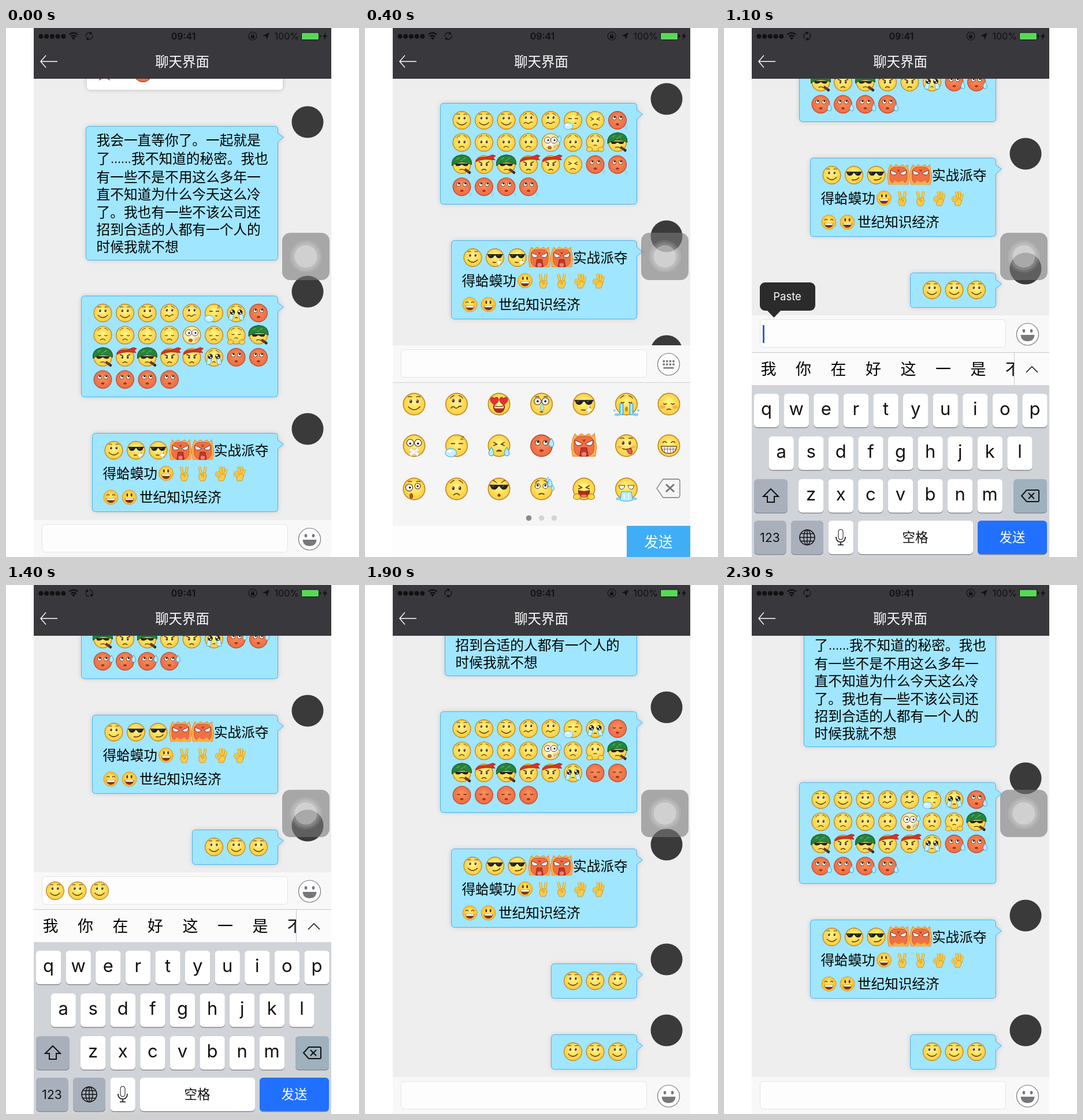
An HTML page with a canvas that plays this animation: 611 px wide and 917 px high, repeating every 2400 ms.

```html
<!DOCTYPE html>
<html lang="zh-CN">
<head>
<meta charset="utf-8">
<title>聊天界面</title>
<style>
html, body { margin: 0; width: 100%; height: 100%; overflow: hidden; background: #fff }
canvas { display: block }
</style>
</head>
<body>
<canvas id="stage" width="611" height="917"></canvas>
<script>
const c = document.getElementById('stage').getContext('2d');
const CJK = '"Noto Sans CJK SC", "Noto Sans CJK", sans-serif', LATIN = 'Inter, sans-serif';
const INK = '#5a300c', GOLD = '#b87a1b', BLUE = '#7fd3f7', SEA = '#2d9fd6';

// ---- drawing helpers ----
function paint(p, fill, line, w = 1) {
  if (fill) { c.fillStyle = fill; c.fill(p); }
  if (line) { c.strokeStyle = line; c.lineWidth = w; c.stroke(p); }
}
const path = (d, fill, line, w) => paint(new Path2D(d), fill, line, w);
function oval(x, y, rx, ry, fill, line, w) {
  const p = new Path2D();
  p.ellipse(x, y, rx, ry, 0, 0, 7);
  paint(p, fill, line, w);
}
const disc = (x, y, r, fill, line, w) => oval(x, y, r, r, fill, line, w);
function box(x, y, w, h, r, fill, line) {
  const p = new Path2D();
  p.roundRect(x, y, w, h, r);
  paint(p, fill, line);
}
function rect(x, y, w, h, fill) { c.fillStyle = fill; c.fillRect(x, y, w, h); }
function text(s, x, y, size, color = '#000', align = 'left', family = CJK, weight = 400) {
  c.font = `${weight} ${size}px ${family}`;
  c.fillStyle = color;
  c.textAlign = align;
  c.fillText(s, x, y + size * .37);
}
const label = (s, x, y, size, color) => text(s, x, y, size, color, 'center', CJK, 300);
function at(x, y, scale, draw, turn = 0) {
  c.save();
  c.translate(x, y);
  c.rotate(turn);
  c.scale(scale, scale);
  draw();
  c.restore();
}
const both = f => [-1, 1].forEach(f);

// ---- faces, drawn in a circle of radius 16 ----
function head(inner = '#fff27e', outer = '#fbcd3c', line = GOLD) {
  const g = c.createRadialGradient(0, -4, 2, 0, 0, 16);
  g.addColorStop(0, inner);
  g.addColorStop(1, outer);
  disc(0, 0, 15.4, g, line, 1.1);
}
const line = (d, w = 1.3, color = INK) => path(d, null, color, w);
const brows = tilt => both(s => line(`M${s * 9} ${-10 + tilt}Q${s * 6} ${-12} ${s * 3} ${-10 - tilt}`, 1));
const dots = (y = -4) => both(s => {
  oval(s * 4.7, y, 2.7, 3.4, '#fff6c8');
  oval(s * 4.7, y, 1.9, 2.6, INK);
  disc(s * 4.7 - .5, y - 1, .7, '#fff');
});
const whites = (r = 5, dx = 0, dy = 0) => both(s => {
  disc(s * 5.5, -4, r, '#fff', INK, .9);
  disc(s * 5.5 + dx, -4 + dy, 1.5, '#111');
});
const closed = (y = -2) => both(s => line(`M${s * 8} ${y}Q${s * 5.5} ${y + 2.5} ${s * 3} ${y}`));
const squint = () => both(s => line(`M${s * 8} -5L${s * 3} -2L${s * 8} 0`));
const frown = () => line('M-4.5 9Q0 4 4.5 9');
const drop = (x, y, k = 1) => at(x, y, k, () => path('M0 -5Q4 1 3 3A3 3 0 0 1 -3 3Q-4 1 0 -5Z', '#b4ebff', SEA, .8));
const shades = () => {
  path('M-14 -6H14L12 -3Q11 1 7 1Q3 1 1 -3.5H-1Q-3 1 -7 1Q-11 1 -12 -3Z', '#202226');
  line('M-10 -3L-7 -4.5M4 -3L7 -4.5', .9, '#777');
};
const hands = y => both(s => oval(s * 10, y, 5, 4, '#ffd84a', GOLD));
const shout = () => path('M-8 2Q0 5 8 2Q8 12 0 12Q-8 12 -8 2Z', '#b32a1c', INK, .8);
const finger = d => { line(d, 5.6, '#c58b1d'); line(d, 4.2, '#fbcb45'); };
const FALL = { 2: -5, 3: -1, 4: 13, 5: 5, 7: -5 };

const faces = {
  smile() { head(); brows(0); dots(); line('M-8.5 3.5Q0 12.5 8.5 3.5'); },
  worry() { head(); brows(2); dots(-5); line('M-8 6q2.5 -4 5 -1.5t5 0 5 -1'); },
  sleep() {
    head(); line('M-8 -3H-2M3 -3H9');
    line('M2 5H6');
    line('M6 -13H10L6 -9H10', 1, '#a06b10');
    oval(-8, 10, 8, 6, '#c9f1ff', '#55b4e0');
    oval(-10, 8, 3, 1.6, '#fff');
  },
  cry(p) {
    head();
    if (p === 4) { squint(); frown(); return; }
    both(s => {
      path(`M${s * 4} 1H${s * 11}L${s * 13} 12H${s * 6}Z`, '#c5f0ff', SEA, .7);
      disc(s * 6.5, -1.5, 4.4, '#222');
      disc(s * 6.5 - 1.5, -3, 1.8, '#fff');
      disc(s * 6.5 + 1, .5, 1.2, '#fff');
    });
    brows(2);
    line('M-2.5 9Q0 6 2.5 9');
  },
  red(p) {
    head('#f98d58', '#ee6a44', '#bb4128');
    if (p === 1) closed();
    else whites(3.4, .6, -1.4);
    oval(0, 7, 2.6, 1.4, '#b23823', '#7e2010', .7);
    if (p in FALL) drop(p === 7 ? 14 : 15, FALL[p], p === 4 ? .5 : 1.1);
  },
  sad(p) { head(); brows(2); p ? dots(-1) : closed(0); frown(); },
  shock(p) {
    head('#fff', '#ffdf72');
    whites(5.4, 1, 0);
    oval(-2, 9, 3, 2.5, '#e2682c', INK, .8);
    line('M6 5V11M9 4V10M12 3V8', .8, '#7b6b60');
    if (p) drop(15, -7);
  },
  palms(p) { head(); brows(2); p ? dots(-3) : closed(); line('M-3 6Q0 3 3 6'); hands(12); },
  helmet() {
    head(); line('M-4 9Q0 7 4 9');
    path('M-12 -2H12L10 2Q5 4 0 0Q-5 4 -10 2Z', '#2b2320');
    path('M-17 2Q-19 -15 0 -17Q18 -16 17 0Q9 -5 0 -4Q-10 -4 -17 2Z', '#25843a', '#17461f');
    line('M-9 -9L-4 -12M2 -9L7 -12M-2 -6L1 -8', 1.4, '#54b45b');
    line('M5 8L14 14', 4.5, '#6c381d');
    line('M12 13L15 15', 4, '#292929');
  },
  bandana() {
    head(); dots(0);
    line('M-9 -5L-3 -2M9 -5L3 -2', 1.6);
    line('M-4 10Q0 6 4 10');
    path('M-14 -8Q-9 -14 4 -13L15 -17L20 -15L16 -12L19 -8L9 -9Q-4 -10 -14 -5Z', '#df3024', '#8e1913', .8);
  },
  cool(p) {
    head(); shades();
    line('M-4 8Q4 10 9 4');
    if (p === 0 || p === 4 || p === 7) path('M7 2L8.5 6.5L13 8L8.5 9.5L7 14L5.5 9.5L1 8L5.5 6.5Z', '#fff');
  },
  fire(p, open = true) {
    path('M-16 15L-18 2L-16 -10L-13 -17L-9 -13L-4 -17L1 -14L7 -17L10 -13L15 -17L16 -8L18 1L16 15Z', '#fbb04c', '#ee8a3a');
    box(-14, -13, 28, 27, 9, '#ef7044', '#d05a30');
    path('M-13 -8L-2 -3Q-7 2 -12 -2ZM13 -8L2 -3Q7 2 12 -2Z', '#fff', '#652015', .8);
    line('M-2 -9L0 -6L2 -9', 1, '#8f2517');
    if (open) path('M-4 3H4L6 15H-6Z', '#c4372a', '#7d2117', .8), oval(0, 12, 3.5, 3, '#ee8170');
    else path('M-11 15L-6 9L0 12L7 9L12 15Z', '#fbb13f');
  },
  love() {
    head(); shout();
    path('M-7 3Q0 5 7 3L6 6H-6Z', '#fff');
    both(s => at(s * 6.5, -4, 1.1, () => path('M0 5Q-8 -1 -4 -5Q-1 -6 0 -3Q1 -6 4 -5Q8 -1 0 5Z', '#e62f38', '#a61925', .7)));
  },
  stare() { head(); brows(0); whites(5, 0, 0); oval(0, 11, 2.5, 1.2, '#a34c14'); drop(1, 4, .8); },
  sob() {
    head(); brows(2); closed(-3);
    both(s => {
      box(s * 7 - 2.2, -1, 4.4, 16, 1, '#a9e7ff', SEA);
      disc(s * 17, 9, 1.6, BLUE);
      oval(s * 13, 15, 4, 2, BLUE);
    });
    oval(0, 7, 2, 3.5, '#c98324');
  },
  shy() {
    head(); closed(-1);
    both(s => oval(s * 9, 4, 4, 2.5, '#f9b05a'));
    line('M-3 8Q0 6 3 8');
  },
  plaster() {
    head(); whites(5, 0, 1);
    line('M-6 5L6 13M6 5L-6 13', 5.5, '#aaa');
    line('M-6 5L6 13M6 5L-6 13', 4.5, '#f5f2ed');
  },
  weep() { head(); squint(); path('M-4 8Q0 4 4 8Z', '#a64318', INK, .8); both(s => drop(s * 11, 8, 1.1)); },
  tongue() {
    head(); brows(0); dots(-4);
    both(s => oval(s * 10, 2, 3, 2, '#f8b052'));
    line('M-6 4Q0 7 7 3');
    path('M0 5L7 4Q10 12 6 12Q2 12 0 5Z', '#eb5452', '#932421', .8);
  },
  grin() {
    head();
    both(s => line(`M${s * 9} -4Q${s * 6} -8 ${s * 3} -4`));
    path('M-11 1H11Q10 11 0 11Q-10 11 -11 1Z', '#fff', INK);
    line('M-6 2V9M-2 2V11M2 2V11M6 2V9M-10 5H10', .6);
  },
  gasp() {
    head(); brows(0);
    disc(-7, -2, 5, '#fff', INK, .9); disc(5, -4, 4, '#fff', INK, .9);
    disc(-6, -2, 1.5, '#111'); disc(5, -4, 1.3, '#111');
    oval(-4, 10, 2, 3.5, '#c9501f', INK, .7);
  },
  gruff() { head(); shades(); brows(-2); oval(0, 9, 1.8, 1.8, '#9c4117', INK, .7); },
  sweat() { head(); brows(2); whites(3.6, 0, -1); line('M-4 8Q0 5 4 8'); drop(12, -9); drop(16, -2, .7); drop(9, -14, .6); },
  yell() { head(); squint(); shout(); oval(0, 10, 4, 2, '#ed7a69'); hands(11); },
  spew() {
    head();
    both(s => path(`M${s * 11} -5H${s * 2}Q${s * 4} 2 ${s * 9} 0Z`, '#fff', INK, .8));
    path('M-7 4H7L9 16Q0 19 -9 16Z', '#b9edff', SEA, .8);
    line('M-3 6V15M3 6V15', 1, '#fff');
    both(s => oval(s * 12, 14, 3, 2, BLUE));
  },
  happy() {
    head('#ffe768', '#fbb928', '#e0961c');
    both(s => oval(s * 4.5, -5, 1.8, 3.6, INK));
    path('M-10 2H10Q8 12 0 12Q-8 12 -10 2Z', '#7a3515');
    path('M-9 2.5H9L8 5.5H-8Z', '#fff');
  },
  beam() {
    head('#ffe768', '#fbb928', '#e0961c');
    both(s => line(`M${s * 9} -4Q${s * 6} -8 ${s * 3} -4`, 1.6));
    path('M-10 2H10Q8 12 0 12Q-8 12 -10 2Z', '#7a3515');
    path('M-9 2.5H9L8 6H-8Z', '#fff');
  },
  peace() {
    finger('M-3 4L-7 -14');
    finger('M3 4L6 -14');
    path('M-8 3Q-4 -1 6 0Q10 4 7 9L4 16H-5L-8 10Z', '#fbcb45', '#c58b1d');
    line('M-5 4Q2 2 3 5Q-1 6 -1 9', 1, GOLD);
  },
  okay() {
    finger('M2 4L-2 -14');
    finger('M5 5L5 -14');
    finger('M7 6L11 -9');
    path('M-4 3Q4 -1 9 4Q9 11 5 16H-4Q-7 11 -4 3Z', '#fbcb45', '#c58b1d');
    disc(-6, 2, 4, null, '#c58b1d', 4.4);
    disc(-6, 2, 4, null, '#fbcb45', 3.2);
  }
};
const face = (kind, x, y, p, r = 16, ...more) => at(x, y, r / 16, () => faces[kind](p, ...more));
const trio = (x, y, n = 3) => { for (let i = 0; i < n; i++) face('smile', x + i * 38.5, y); };

// ---- chat ----
const GRID = [
  'smile smile smile worry worry sleep cry red',
  'sad sad sad sad shock sad palms helmet',
  'helmet bandana helmet bandana bandana cry red red',
  'red red red red'
].map(row => row.split(' '));
const STORY = ['我会一直等你了。一起就是', '了', '有一些不是不用这么多年一', '直不知道为什么今天这么冷',
  '了。我也有一些不该公司还', '招到合适的人都有一个人的', '时候我就不想'];
const STORY_Y = [194, 226, 258, 288, 319, 349, 379];

function bubble(x, y, h) {
  disc(522, y - 7, 27.5, '#3a3a3a');
  const w = 470 - x;
  const d = `M6 0H${w - 6}q6 0 6 6V12l10 7l-10 8V${h - 6}q0 6 -6 6H6q-6 0 -6 -6V6q0 -6 6 -6Z`;
  at(x + .5, y + .5, 1, () => {
    c.shadowColor = 'rgba(0,0,0,.16)';
    c.shadowBlur = 10;
    path(d, '#a0e6ff');
    c.shadowBlur = 0;
    path(d, null, '#4db3ea');
  });
}

function chat(tick, sent) {
  const p = tick % 6, open = ![2, 5, 6, 7].includes(tick % 9);
  c.save();
  c.shadowColor = 'rgba(0,0,0,.2)';
  c.shadowBlur = 8;
  box(140, 0, 339, 107, 6, '#fff');
  c.restore();
  face('red', 237, 78, 0);
  line('M161 90L165 88M176 88L180 90', 1.5, '#b5492e');

  bubble(138, 170, 232);
  STORY.forEach((s, i) => text(s, 156.5, STORY_Y[i], 23.7));
  text('......', 181, 226, 21.5, '#000', 'left', '"Liberation Sans", sans-serif');
  text('我不知道的秘密。我也', 217, 226, 23.7);

  bubble(130, 464, 175);
  GRID.forEach((row, j) => row.forEach((kind, i) => face(kind, 167.5 + i * 38.5, 494 + j * 38.4, p)));

  bubble(149, 702, 136);
  face('smile', 186.5, 732);
  face('cool', 225, 732, p);
  face('cool', 263.5, 732, p);
  face('fire', 302, 732, p, 17, open);
  face('fire', 340.5, 732, p, 17, open);
  text('实战派夺', 360, 732, 23.6);
  text('得蛤蟆功', 167.5, 772, 23.6);
  ['happy', 'peace', 'peace', 'okay', 'okay'].forEach((kind, i) => face(kind, 277 + i * 31.7, 772, p, 13));
  face('beam', 181.5, 813.5, p, 13);
  face('happy', 213.5, 813.5, p, 13);
  text('世纪知识经济', 231, 813.5, 23.6);

  for (let i = 0; i < sent; i++) {
    const y = LAST[i + 1] - 60;
    bubble(322, y, 60);
    trio(360, y + 30);
  }
}

// ---- fixed interface ----
function header(tick) {
  rect(48, 0, 515, 88, '#39383d');
  for (let i = 0; i < 5; i++) disc(60.5 + i * 9.7, 14.5, 4, '#111');
  line('M109.5 11.5Q117 5 124.5 11.5M112.5 15Q117 11 121.5 15', 2.3, '#111');
  path('M114 17Q117 14.5 120 17L117 20.5Z', '#111');
  at(144, 14, 1, () => {
    line('M-5.5 1A5.5 5.5 0 0 1 3 -4.7M5.5 -1A5.5 5.5 0 0 1 -3 4.7', 1.3, '#111');
    path('M2 -8L6 -4L1 -2ZM-2 8L-6 4L-1 2Z', '#111');
  }, tick * .8);
  text('09:41', 307, 14.5, 15.8, '#111', 'center', LATIN, 600);
  disc(427, 14, 7, null, '#111', 1.2);
  rect(424, 13, 6, 5, '#111');
  line('M425 13V11.5Q427 8.5 429 11.5V13', 1, '#111');
  path('M456 8L451.5 20L450 14.5L444 13.5Z', '#111');
  text('100%', 507, 14.5, 16, '#111', 'right', LATIN);
  box(511.5, 8, 30, 12.5, 2, '#57d957', '#111');
  rect(543, 12, 2, 4, '#111');
  path('M554 8L548 15H551.5L550 21L556 13H552.5Z', '#111');
  line('M89 58H60M69 47.5L60 58L69 68.5', 1.4, '#fff');
  label('聊天界面', 305, 58.5, 23.4, '#fff');
}

function touchButton() {
  box(478, 355, 82, 82, 14, 'rgba(120,120,120,.6)');
  [28, 24, 19.5].forEach((r, i) => disc(519, 396, r, `rgba(255,255,255,${[.1, .14, .3][i]})`));
}

function inputBar(y, pad, typed, cursor) {
  rect(48, y, 515, 64, '#f8f8f8');
  box(62.5, y + 7.5, 425, 48, 6, '#fdfdfd', '#e3e3e3');
  trio(85, y + 32, typed);
  if (cursor) rect(67, y + 17, 3, 31, cursor);
  at(525.5, y + 33, 1, () => {
    disc(0, 0, 19, '#fdfdfd', '#77777b', 1.2);
    if (pad === 'faces') {
      for (let i = 0; i < 8; i++) rect(-10 + i % 4 * 5.6, -7 + (i >> 2) * 5.5, 3.4, 3.4, '#77777b');
      rect(-9, 5, 18, 2.5, '#77777b');
    } else {
      both(s => oval(s * 6.5, -6, 2.3, 3, '#77777b'));
      path('M-12 1H12Q11 12 0 12Q-11 12 -12 1Z', '#77777b');
    }
  });
}

const PANEL = ['smile worry love stare cool sob shy', 'plaster sleep weep red fire tongue grin',
  'gasp sad gruff sweat yell spew'].map(row => row.split(' '));
function facePad() {
  rect(48, 614, 515, 249, '#f5f5f5');
  rect(48, 614, 515, 1, '#d2d2d2');
  PANEL.forEach((row, j) => row.forEach((kind, i) => face(kind, 85 + i * 73.5, [652, 724, 799][j], 7, 19.5)));
  path('M516 782H541Q545 782 545 786V810Q545 814 541 814H516L505 798Z', null, '#77777b', 1.3);
  line('M521 791L535 804M535 791L521 804', 3, '#77777b');
  [283.5, 305.5, 327.5].forEach((x, i) => disc(x, 849.5, 4.8, i ? '#d4d4d4' : '#8a8a8e'));
  rect(48, 863, 515, 54, '#fdfdfd');
  rect(453, 863, 110, 54, '#3faef6');
  label('发送', 508, 891, 24.5, '#fff');
}

function key(x, y, w, fill = '#fff') {
  box(x, y + 1.5, w, 58, 6, '#898c91');
  box(x, y, w, 58, 6, fill);
}
function letters(s, x, y) {
  [...s].forEach((ch, i) => {
    key(x + i * 51.6, y, 43.3);
    text(ch, x + 21.6 + i * 51.6, y + 26, 31, '#111', 'center', LATIN);
  });
}
function keyPad() {
  rect(48, 562, 515, 57, '#fbfbfc');
  rect(48, 562, 515, 1, '#c4c7cb');
  c.save();
  c.beginPath();
  c.rect(48, 562, 454, 57);
  c.clip();
  [...'我你在好这一是不'].forEach((ch, i) => text(ch, 77 + i * 60.5, 591, 27, '#000', 'center'));
  c.restore();
  rect(502, 563, 1, 56, '#c4c7cb');
  line('M523 597L533 587L543 597', 1.7, '#222');
  rect(48, 619, 515, 298, '#d0d4d9');
  const gray = '#a8b0bc';
  letters('qwertyuiop', 52, 634);
  letters('asdfghjkl', 77.5, 708);
  letters('zxcvbnm', 129, 782);
  key(52, 782, 58, gray);
  path('M81 799L94 812H87V822H75V812H68Z', null, '#111', 2);
  key(501, 782, 58, '#9eb1bd');
  path('M524 801H543Q545 801 545 803V819Q545 821 543 821H524L515 811Z', null, '#111', 2);
  line('M527 806L537 816M537 806L527 816', 2, '#111');
  key(52, 854, 55.5, gray);
  text('123', 79.5, 883, 21, '#111', 'center', LATIN);
  key(116, 854, 56, gray);
  at(144, 883, 1, () => {
    disc(0, 0, 13, null, '#111', 1.6);
    oval(0, 0, 6, 13, null, '#111', 1.4);
    line('M-13 0H13M0 -13V13M-11 -6.5H11M-11 6.5H11', 1.4, '#111');
  });
  key(180.5, 854, 43.3);
  box(198, 869, 8, 18, 4, null, '#111');
  line('M194 882Q194 891 202 891Q210 891 210 882M202 891V896M197 896H207', 1.7, '#111');
  key(232, 854, 199);
  text('空格', 331, 883, 22.5, '#111', 'center');
  key(439, 854, 120, '#2170ff');
  text('发送', 499, 883, 22.5, '#fff', 'center');
}

function menu(tip, hot) {
  const y = tip - 61, w = 86.4, dark = 'rgba(16,16,16,.92)';
  c.save();
  c.beginPath();
  c.roundRect(117, y, 432, 49, 9);
  c.clip();
  ['复制', '转发', '收藏', '撤回', '删除'].forEach((s, i) => {
    const x = 117 + i * w;
    rect(x, y, w, 49, i === hot ? '#8e8e8e' : dark);
    if (i) rect(Math.round(x) - 1, y, 1, 49, '#d8d8d8');
    label(s, x + 43, y + 24.5, 19.8, '#fff');
  });
  c.restore();
  path(`M388 ${y + 49}H414L401 ${tip}Z`, dark);
}

function pasteTip(fill) {
  box(62, 441, 96, 49, 9, fill);
  path('M74 489H99L86.5 502Z', fill);
  text('Paste', 109.5, 465, 18.5, '#fff', 'center', LATIN);
}

// ---- timeline: each step holds until the next, in tenths of a second ----
const BAR = { none: 853, faces: 550, keys: 498 };
const LAST = [839, 961, 1084];
const STEPS = [
  { from: 0 },
  { from: 1, pad: 'faces' },
  { from: 2, pad: 'faces', typed: 1 },
  { from: 3, pad: 'faces', typed: 3 },
  { from: 4, pad: 'faces', sent: 1, lag: 91 },
  { from: 5, pad: 'faces', sent: 1 },
  { from: 7, pad: 'faces', sent: 1, hot: -1 },
  { from: 8, pad: 'faces', sent: 1, hot: 0 },
  { from: 9, pad: 'faces', sent: 1 },
  { from: 10, pad: 'keys', sent: 1 },
  { from: 11, pad: 'keys', sent: 1, paste: '#2b2b2c' },
  { from: 12, pad: 'keys', sent: 1, paste: '#7d7d7d' },
  { from: 13, pad: 'keys', sent: 1, typed: 3 },
  { from: 15, pad: 'keys', sent: 2 },
  { from: 18, sent: 2 },
  { from: 20, sent: 2, hot: -1 },
  { from: 21, sent: 2, hot: 4 },
  { from: 22, sent: 1 }
];

function draw(tick) {
  const step = STEPS.findLast(s => s.from <= tick);
  const { pad = 'none', sent = 0, typed = 0, lag = 0, hot, paste } = step;
  const bar = BAR[pad], scroll = LAST[sent] + 14 - bar - lag;
  rect(0, 0, 611, 917, '#fff');
  rect(48, 0, 515, 917, '#eee');
  c.save();
  c.beginPath();
  c.rect(48, 88, 515, bar - 88);
  c.clip();
  c.translate(0, -scroll);
  chat(tick, sent);
  c.restore();
  touchButton();
  const blink = tick % 5 === 1 && !paste ? '#d3dcec' : '#2d62c9';
  inputBar(bar, pad, typed, pad === 'keys' && !typed && blink);
  if (pad === 'faces') facePad();
  if (pad === 'keys') keyPad();
  if (hot !== undefined) menu(LAST[sent] - 60 - scroll, hot);
  if (paste) pasteTip(paste);
  header(tick);
}

const start = performance.now();
let shown = -1;
function loop() {
  const tick = Math.floor((performance.now() - start) % 2400 / 100);
  if (tick !== shown) draw(shown = tick);
  requestAnimationFrame(loop);
}
loop();
</script>
</body>
</html>
```
